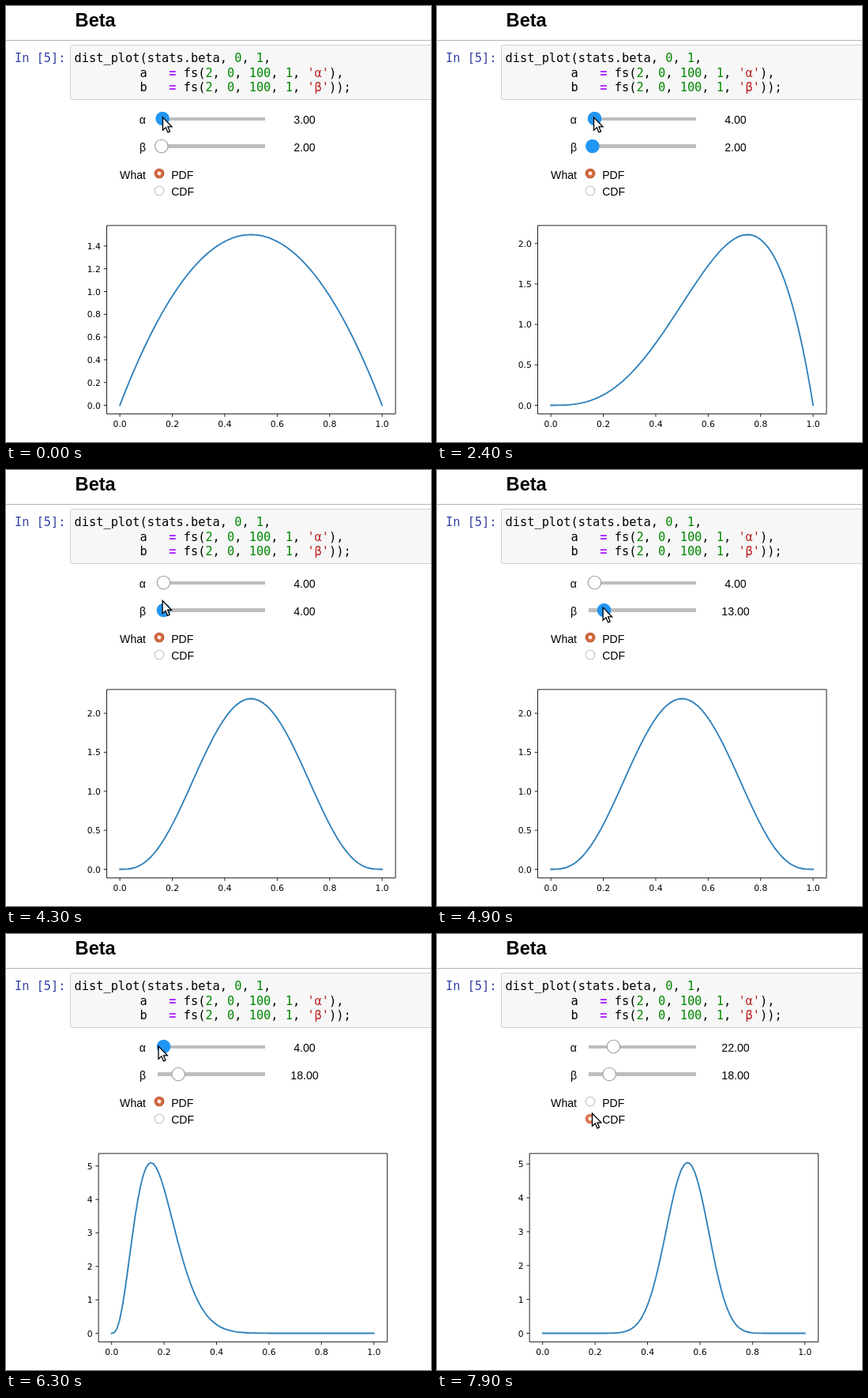
An HTML page that plays this animation: 538 by 552 pixels, repeating every 8000 ms.

```html
<!DOCTYPE html>
<html lang="en">
<head>
<meta charset="utf-8">
<title>Beta</title>
<style>
  html, body { margin: 0; width: 100%; height: 100%; overflow: hidden; background: #fff; }
  svg { display: block; }
  text { white-space: pre; }
  .ui { font: 14.1px "Liberation Sans", Arial, sans-serif; }
  .head { font: bold 23.6px "Liberation Sans", Arial, sans-serif; }
  .code { font: 15.3px "DejaVu Sans Mono", monospace; }
  .num { fill: #080; }
  .op { fill: #a2f; font-weight: bold; }
  .str { fill: #ba2121; }
  .end { text-anchor: end; }
  .mid { text-anchor: middle; }
  .track { fill: #bdbdbd; }
  .handle { fill: #fff; stroke: #9e9e9e; stroke-width: 1.1; }
  .handle.on { fill: #2196f3; stroke: #2196f3; }
  .ring { fill: #fff; stroke: #c2c2c2; stroke-width: 1.1; }
  .dot { fill: none; }
  .on > .ring { fill: #d4683f; stroke: #b9532f; }
  .on > .dot { fill: #fbeee8; }
  .soft.on > .ring { fill: #dc7d5c; stroke: #d4714f; }
  #plot { font: 10.8px "DejaVu Sans", sans-serif; }
  .axis { fill: none; stroke: #000; stroke-width: .87; }
  .curve { fill: none; stroke: #2f81bb; stroke-width: 1.85; stroke-linejoin: round; stroke-linecap: square; }
</style>
</head>
<body>
<svg width="538" height="552" viewBox="0 0 538 552">
  <text class="head" x="87.6" y="26">Beta</text>
  <rect y="43" width="538" height="1" fill="#b4b4b4"/>

  <text class="code" x="11" y="71" fill="#303f9f">In [5]:</text>
  <rect x="81.5" y="49.5" width="480" height="69" rx="2" fill="#f7f7f7" stroke="#cfcfcf"/>
  <g class="code">
    <text x="86.6" y="71">dist_plot(stats.beta, <tspan class="num">0</tspan>, <tspan class="num">1</tspan>,</text>
    <text x="86.6" y="90">         a   <tspan class="op">=</tspan> fs(<tspan class="num">2</tspan>, <tspan class="num">0</tspan>, <tspan class="num">100</tspan>, <tspan class="num">1</tspan>, <tspan class="str">'α'</tspan>),</text>
    <text x="86.6" y="108">         b   <tspan class="op">=</tspan> fs(<tspan class="num">2</tspan>, <tspan class="num">0</tspan>, <tspan class="num">100</tspan>, <tspan class="num">1</tspan>, <tspan class="str">'β'</tspan>));</text>
  </g>

  <g class="ui">
    <text class="end" x="177" y="149">α</text>
    <rect class="track" x="192" y="141" width="136" height="4"/>
    <circle class="handle" id="handleA" cy="142.5" r="8.25"/>
    <text class="mid" id="valueA" x="378" y="149"></text>
    <rect id="focus" x="338.5" y="126.5" width="79" height="32" fill="none" stroke="#000" stroke-dasharray="1 1"/>

    <text class="end" x="177" y="184">β</text>
    <rect class="track" x="192" y="175" width="136" height="5"/>
    <circle class="handle" id="handleB" cy="177.5" r="8.25"/>
    <text class="mid" id="valueB" x="378" y="184"></text>

    <text class="end" x="177" y="219">What</text>
    <g id="pdf"><circle class="ring" cx="194" cy="212" r="5.8"/><circle class="dot" cx="194" cy="212" r="2.4"/></g>
    <text x="209.2" y="219">PDF</text>
    <g id="cdf" class="soft"><circle class="ring" cx="194" cy="234" r="5.8"/><circle class="dot" cx="194" cy="234" r="2.4"/></g>
    <text x="209.2" y="240">CDF</text>
  </g>

  <g id="plot"></g>

  <path id="cursor" d="M0 0V16.2L3.8 12.8L6.4 18.9L9 17.8L6.4 11.8H11.4Z" fill="#fff" stroke="#000" stroke-width="1.3"/>
</svg>
<script>
const LOOP = 8000, TICK = 100;
const $ = id => document.getElementById(id);

// Pointer rests at home, then follows these legs: start, end, x, y.
const home = { x: 198.5, y: 141 };
const legs = [
  [4000, 4450, 198, 174],     // down to the second slider
  [4450, 5200, 216.7, 174],   // drag it
  [5600, 6300, 193, 142],     // back up to the first
  [6300, 6700, 217, 142],     // drag it
  [7000, 7800, 196.5, 227],   // down to the CDF option
];
const [, dragB, , dragA] = legs;

const ease = p => p * p * (3 - 2 * p);
const progress = (t, from, to) => Math.min(1, Math.max(0, (t - from) / (to - from)));
const passed = (t, ...times) => times.filter(s => t >= s).length;

function pointerAt(t) {
  return legs.reduce((p, [from, to, x, y]) => {
    const k = ease(progress(t, from, to));
    return { x: p.x + (x - p.x) * k, y: p.y + (y - p.y) * k };
  }, home);
}

// Three slider steps per four pixels of travel.
const dragged = (t, [from, to]) =>
  Math.round((pointerAt(Math.min(Math.max(t, from), to)).x - pointerAt(from).x) * 0.75);

function focusAt(t) {
  return ["A", "readout", "B", "A", "radio"][passed(t, 2100, 2400, dragA[0], 7700)];
}

const fact = n => n < 2 ? 1 : n * fact(n - 1);
const density = (x, a, b) =>
  x ** (a - 1) * (1 - x) ** (b - 1) * fact(a + b - 1) / (fact(a - 1) * fact(b - 1));

function tickStep(range) {
  const raw = range / 9, mag = 10 ** Math.floor(Math.log10(raw));
  return mag * [1, 2, 2.5, 5, 10].find(s => s * mag >= raw);
}

function drawPlot(a, b) {
  const N = 100, W = 332, H = 216, base = 505.5, top = 277.9, bottom = 516.4;
  const ys = Array.from({ length: N + 1 }, (_, i) => density(i / N, a, b));
  const max = Math.max(...ys);
  const step = tickStep(max * 1.1);
  const digits = step >= 1 ? 0 : Math.abs(step * 10 - Math.round(step * 10)) > 1e-6 ? 2 : 1;
  // The axes start after the widest tick label.
  const labelWidth = 10.9 * (0.636 * (1 + digits) + (digits ? 0.318 : 0));
  const left = 102.6 + labelWidth + 7.6;
  const x0 = left + W * 0.05;
  const px = x => x0 + W * x, py = y => base - H * y / max;

  let marks = `M${left} ${top}H${left + W * 1.101}V${bottom}H${left}Z`, labels = "";
  for (let i = 0; i <= 5; i++) {
    const x = px(i / 5);
    marks += `M${x} ${bottom}v3.8`;
    labels += `<text class="mid" x="${x}" y="533">${(i / 5).toFixed(1)}</text>`;
  }
  for (let i = 0; i * step <= max * 1.05; i++) {
    const y = py(i * step);
    marks += `M${left} ${y}h-3.8`;
    labels += `<text class="end" x="${left - 7.6}" y="${y + 4}">${(i * step).toFixed(digits)}</text>`;
  }
  const line = ys.map((y, i) => `${px(i / N).toFixed(2)} ${py(y).toFixed(2)}`).join("L");
  $("plot").innerHTML =
    `<path class="curve" d="M${line}"/><path class="axis" d="${marks}"/>${labels}`;
}

function setSlider(name, value, focused, pointer) {
  const handle = $("handle" + name), x = 194.15 + value * 4 / 3;
  const hover = Math.hypot(pointer.x - x, pointer.y - handle.getAttribute("cy")) < 8.8;
  handle.setAttribute("cx", x);
  handle.classList.toggle("on", focused || hover);
  $("value" + name).textContent = value.toFixed(2);
}

const start = performance.now();
let drawn = "";

function frame() {
  const now = (performance.now() - start) % LOOP;
  const t = Math.floor(now / TICK) * TICK;
  const pointer = pointerAt(t), focus = focusAt(t);
  $("cursor").setAttribute("transform", `translate(${pointer.x} ${pointer.y})`);

  // Key presses come first, then the drags.
  setSlider("A", 3 + passed(t, 800) + dragged(t, dragA), focus === "A", pointer);
  setSlider("B", 2 + passed(t, 3000, 3400) + dragged(t, dragB), focus === "B", pointer);
  $("focus").style.display = focus === "readout" ? "" : "none";
  $("pdf").classList.toggle("on", t < 7900);
  $("cdf").classList.toggle("on", t >= 7900);

  // The plot lags behind the sliders.
  const a = 2 + passed(t, 300, 1100) + 18 * passed(t, 7000);
  const b = 2 + passed(t, 3400, 3700) + 14 * passed(t, 5400);
  if (drawn !== a + "," + b) {
    drawn = a + "," + b;
    drawPlot(a, b);
  }
  requestAnimationFrame(frame);
}
frame();
</script>
</body>
</html>
```
